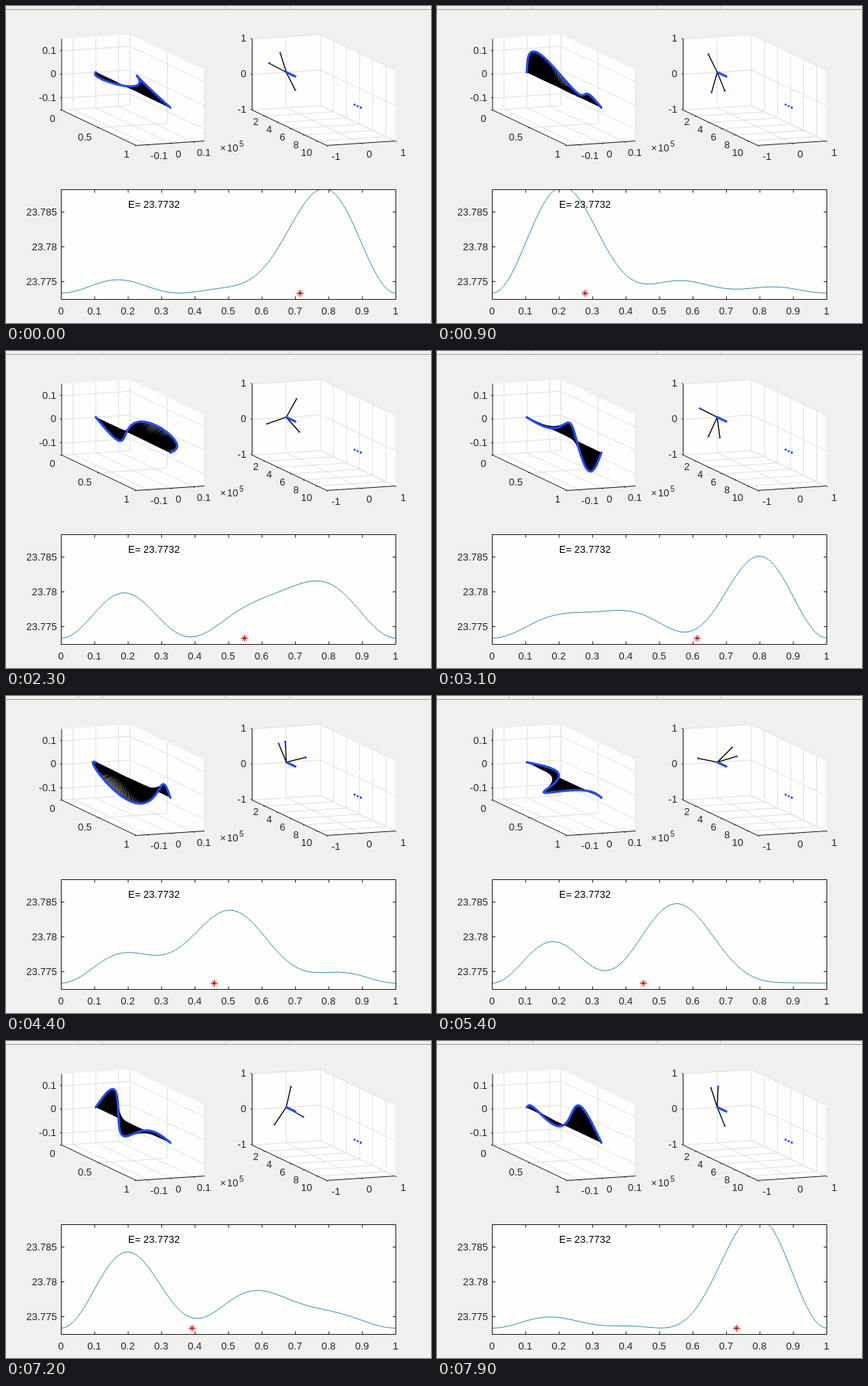
Animation of 550 by 410 pixels, one loop 8000 ms. Source, as an HTML page:

```html
<!DOCTYPE html>
<html lang="en">
<head>
<meta charset="utf-8">
<title>Three rotating modes</title>
<style>
  html, body { margin: 0; width: 100%; height: 100%; overflow: hidden; background: #f0f0ee; }
  svg { display: block; }
  text { font: 13px "Liberation Sans", Arial, sans-serif; fill: #262626; }
  path { fill: none; stroke-linejoin: round; }
  .wall { fill: #fdfdfc; }
  .grid { stroke: #e0e0dc; }
  .axis { stroke: #262626; }
  .black { stroke: #000; stroke-width: 1.3; }
  .blue { stroke: #2149ff; stroke-width: 3; stroke-linecap: round; }
</style>
</head>
<body>
<svg id="stage" width="550" height="410" viewBox="0 0 550 410"></svg>
<script>
const stage = document.getElementById('stage');

function add(tag, attrs, content = '') {
  const el = document.createElementNS('http://www.w3.org/2000/svg', tag);
  for (const key in attrs) el.setAttribute(key, attrs[key]);
  el.textContent = content;
  stage.append(el);
  return el;
}
const path = (cls, d = '') => add('path', { class: cls, d });
const label = (x, y, s, anchor = 'middle') => add('text', { x, y: y + 4.5, 'text-anchor': anchor }, s);
const poly = pts => 'M' + pts.map(p => p.map(n => n.toFixed(2))).join('L');

// Oblique box: u runs 0..1 in depth, v and w run -1..1 across and up
const project = origin => (u, v, w) =>
  [origin + 44.2 * (1 + v) + 96.5 * u, 85.7 + 45.8 * u - 2.9 * v - 46 * w];

function drawBox(at, us, vs, ws) {
  path('wall', poly([at(0, -1, 1), at(0, 1, 1), at(1, 1, 1), at(1, 1, -1), at(1, -1, -1), at(0, -1, -1)]));
  const lines = [
    ...us.map(u => [at(u, -1, -1), at(u, 1, -1), at(u, 1, 1)]),
    ...vs.map(v => [at(1, v, -1), at(0, v, -1), at(0, v, 1)]),
    ...ws.map(w => [at(0, -1, w), at(0, 1, w), at(1, 1, w)])
  ];
  path('grid', lines.map(poly).join(''));
  const shift = ([x, y], dx, dy) => [[x, y], [x + dx, y + dy]];
  const ticks = [
    ...us.map(u => shift(at(u, -1, -1), -2, 0.2)),
    ...vs.map(v => shift(at(1, v, -1), 2, 1)),
    ...ws.map(w => shift(at(0, -1, w), -2, -1))
  ];
  path('axis', poly([at(0, -1, 1), at(0, -1, -1), at(1, -1, -1), at(1, 1, -1)]) + ticks.map(poly).join(''));
}

// Window edge
path('', 'M0 4.5H550').setAttribute('stroke', '#a3a3a0');
path('', 'M93.5 0v4M124.5 0v4M284.5 0v4M367.5 0v4').setAttribute('stroke', '#cacac6');

// String plot
const string = project(72);
drawBox(string, [0, 0.5, 1], [-2 / 3, 0, 2 / 3], [-2 / 3, 0, 2 / 3]);
['0.1', '0', '-0.1'].forEach((s, i) => label(65, 57 + 30.5 * i, s, 'end'));
[[60, 145, '0'], [102, 169, '0.5'], [156, 191, '1'],
 [198, 193, '-0.1'], [223, 191, '0'], [256, 189, '0.1']].forEach(a => label(...a));

// Spectrum plot
const spectrum = project(318.5);
drawBox(spectrum, [2, 4, 6, 8, 10].map(n => n / 11.4), [-1, 0, 1], [-1, 0, 1]);
['1', '0', '-1'].forEach((s, i) => label(311, 41 + 46.3 * i, s, 'end'));
[2, 4, 6, 8, 10].forEach((n, i) => label(327 + 17.3 * i, 149 + 10 * i, n, 'end'));
[[427, 194, '-1'], [470, 191, '0'], [514, 189, '1']].forEach(a => label(...a));
label(277, 183, '×', 'start');
label(286, 183, '10', 'start');
label(302, 177, '5', 'start').style.fontSize = '10px';

// Energy plot
const left = 71.5, ceiling = 237.5, width = 433, height = 142, base = 371.3;
add('rect', { x: left, y: ceiling, width, height, fill: '#fdfdfc' });
const curve = path('');
curve.setAttribute('stroke', '#3197b2');
let border = `M${left} ${ceiling}h${width}v${height}h${-width}z`;
for (let i = 0; i <= 10; i++) {
  const x = left + i * width / 10;
  border += `M${x} ${ceiling}v4m0 ${height - 8}v4`;
  label(x - 0.5, 394.5, i / 10);
}
['23.785', '23.78', '23.775'].forEach((s, i) => {
  const y = 266.5 + 45 * i;
  border += `M${left} ${y}h4m${width - 8} 0h4`;
  label(66, y, s, 'end');
});
path('axis', border);
label(158, 256.5, 'E= 23.7732', 'start').style.fill = '#000';
const star = path('', 'M-4.5 0h9M0 -4.5v9M-3 -3l6 6M3 -3l-6 6');
star.setAttribute('stroke', '#d40000');

// Moving parts
const stems = path('black');
const rope = path('blue');
const arms = path('black');
path('blue', poly([spectrum(0, 0, 0), spectrum(0.12, 0, 0)]));
const dot = ([cx, cy]) => add('circle', { cx, cy, r: 1.4, fill: '#2149ff' });
[0.917, 0.958, 1].forEach(u => dot(spectrum(u, 0, 0)));
const tips = [0, 1, 2].map(() => dot([0, 0]));

// Start angle, turn per step (degrees) and sign of each mode shape
const modes = [[297, 7.293, -1], [107.6, 29.2, -1], [150.3, 65.64, 1]];
const amplitude = 0.0519 / 0.15, points = 120;

// Redraw times in tenths of a second
const beats = [
  1, 2, 3, 6, 7, 9, 10, 12, 13, 15, 16, 18, 19, 21, 25, 25, 26, 28, 29, 31,
  32, 34, 35, 37, 38, 40, 41, 44, 45, 47, 48, 50, 51, 53, 54, 56, 57, 59, 60, 62,
  66, 67, 69, 70, 72, 73, 75, 76, 78, 79
];

function draw(step) {
  const phasors = modes.map(([start, turn, sign]) => {
    const angle = (start - turn * step) * Math.PI / 180;
    return { y: Math.cos(angle), z: Math.sin(angle), sign };
  });

  let spokes = '';
  phasors.forEach(({ y, z }, i) => {
    const tip = spectrum(0, y / Math.sqrt(3), z / Math.sqrt(3));
    spokes += poly([spectrum(0, 0, 0), tip]);
    tips[i].setAttribute('cx', tip[0]);
    tips[i].setAttribute('cy', tip[1]);
  });
  arms.setAttribute('d', spokes);

  const ropePts = [], curvePts = [];
  let lines = '', sum = 0, moment = 0;
  for (let i = 0; i <= points; i++) {
    const x = i / points;
    let y = 0, z = 0;
    phasors.forEach((p, k) => {
      const shape = p.sign * Math.sin((k + 1) * Math.PI * x);
      y += shape * p.y;
      z += shape * p.z;
    });
    const density = y * y + z * z;
    const pt = string(x, amplitude * y, amplitude * z);
    ropePts.push(pt);
    lines += poly([string(x, 0, 0), pt]);
    curvePts.push([left + width * x, Math.max(ceiling, base - 24.25 * density)]);
    sum += density;
    moment += density * x;
  }
  stems.setAttribute('d', lines);
  rope.setAttribute('d', poly(ropePts));
  curve.setAttribute('d', poly(curvePts));
  star.setAttribute('transform', `translate(${left + width * moment / sum} 371.5)`);
}

function tick() {
  const now = performance.now() % 8000;
  draw(beats.filter(b => b * 100 <= now).length);
  requestAnimationFrame(tick);
}
tick();
</script>
</body>
</html>
```
